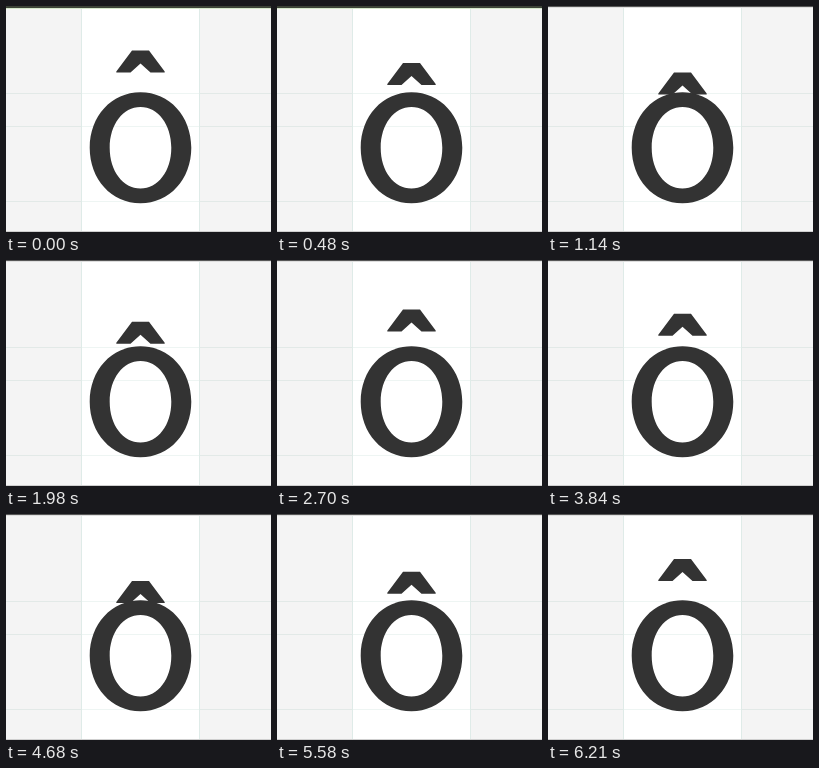
Recreate the animation shown at these times as an HTML page. Size 265 by 226 pixels, loop 6.24 s.

```html
<!DOCTYPE html>
<html lang="en">
<head>
<meta charset="utf-8">
<title>Circumflex position</title>
<style>
html, body { margin: 0; width: 100%; height: 100%; overflow: hidden; background: #f4f4f4; }
svg { display: block; width: 100vw; height: 100vh; }
</style>
</head>
<body>
<svg viewBox="0 0 265 226" preserveAspectRatio="none">
  <rect width="265" height="226" fill="#f4f4f4"/>
  <path d="M0 87.5H265M0 120.5H265M0 195.5H265" stroke="#e2e9e7"/>
  <rect x="76" width="117" height="226" fill="#fff"/>
  <path d="M76 87.5H193M76 120.5H193M76 195.5H193" stroke="#eef5f3"/>
  <path d="M75.5 0V226M193.5 0V226" stroke="#dfebe8"/>
  <path d="M0 225.5H265" stroke="#cfcfcf"/>
  <path d="M0 .5H265" stroke="#565656"/>
  <path d="M0 1.5H265" stroke="#dedede"/>
  <g id="green">
    <path d="M0 1H265" stroke="#3c4337" stroke-width="2"/>
    <path d="M0 2.5H265" stroke="#d3e6ca"/>
  </g>
  <g fill="#333">
    <path id="letter" fill-rule="evenodd"/>
    <path id="accent" d="M126 0H143L158.7 21V22H144.5L134.5 13L124.5 22H110.3V21Z"/>
  </g>
</svg>
<script>
const $ = id => document.getElementById(id);
const LOOP = 6240, HIGH = 44.4, LOW = 67;

// The accent alternately sinks and rises, resting between moves
const moves = [
  { from: 0, to: 1260, power: 1.7 },
  { from: 1680, to: 3000, power: 1 },
  { from: 3240, to: 4680, power: 1 },
  { from: 5130, to: LOOP, power: 1 }
];

function oval(cx, cy, rx, ry) {
  const kx = rx * 0.57, ky = ry * 0.57;
  return `M${cx} ${cy - ry}` +
    `c${kx} 0 ${rx} ${ry - ky} ${rx} ${ry}` +
    `s${kx - rx} ${ry} ${-rx} ${ry}` +
    `s${-rx} ${ky - ry} ${-rx} ${-ry}` +
    `s${rx - kx} ${-ry} ${rx} ${-ry}z`;
}

function accentTop(t) {
  const i = moves.findLastIndex(m => m.from <= t);
  const { from, to, power } = moves[i];
  const left = Math.max(0, (to - t) / (to - from)) ** power;
  const [a, b] = i % 2 ? [LOW, HIGH] : [HIGH, LOW];
  return b + (a - b) * left;
}

function draw(now) {
  const t = Math.max(0, now - start) % LOOP;
  $('accent').setAttribute('transform', `translate(0 ${accentTop(t).toFixed(2)})`);
  $('green').setAttribute('visibility', t < 630 ? 'visible' : 'hidden');
  requestAnimationFrame(draw);
}

$('letter').setAttribute('d', oval(134.5, 141.7, 50.8, 55.5) + oval(134.5, 141.7, 30.8, 40.8));
const start = performance.now();
draw(start);
</script>
</body>
</html>
```
